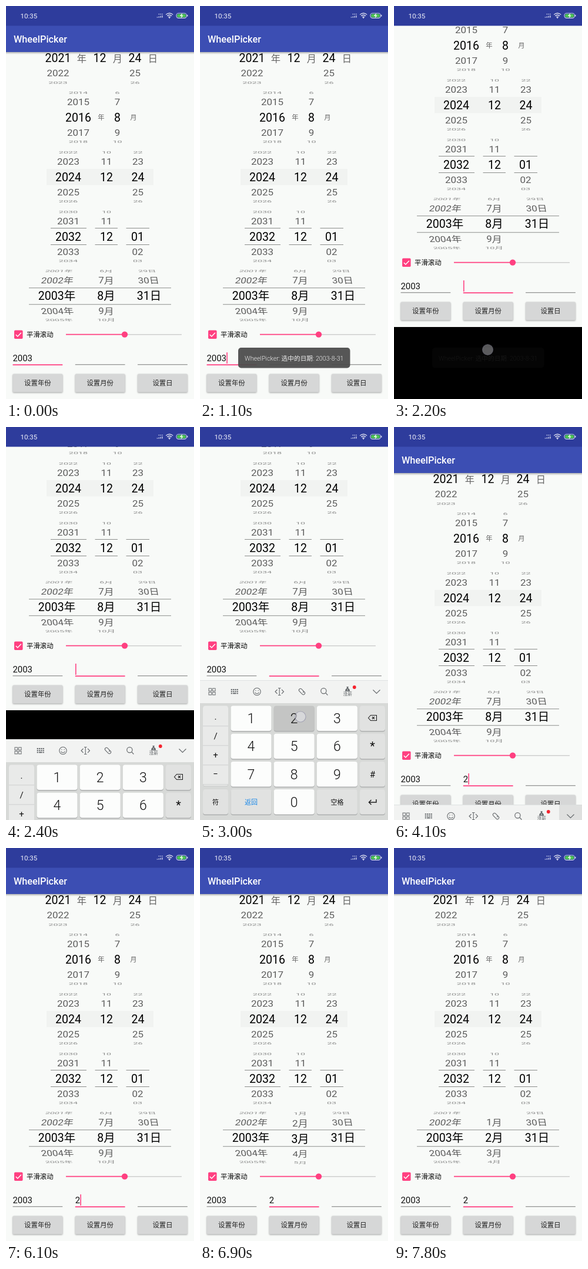
An HTML page with a canvas for the animation above (8 s loop, 320 px wide and 666 px high).

```html
<!DOCTYPE html>
<html lang="zh-CN">
<head>
<meta charset="utf-8">
<style>
  html, body { margin: 0; width: 100%; height: 100%; overflow: hidden; background: #000; }
  canvas { display: block; width: 320px; height: 666px; }
</style>
</head>
<body>
<canvas></canvas>
<script>
const W = 320, H = 666, LOOP = 8000;
const PINK = '#ff4081', BG = '#f8faf8';
const FONT = 'Roboto, "Noto Sans CJK SC", "Noto Sans CJK", sans-serif';
const canvas = document.querySelector('canvas');
const c = canvas.getContext('2d');
const dpr = window.devicePixelRatio || 1;
canvas.width = W * dpr;
canvas.height = H * dpr;

const ramp = (t, a, b) => Math.min(1, Math.max(0, (t - a) / (b - a)));
const easeOut = p => 1 - (1 - p) ** 2;
const smooth = p => p * p * (3 - 2 * p);

function rect(x, y, w, h, fill, r = 0) {
  c.fillStyle = fill;
  c.beginPath();
  c.roundRect(x, y, w, h, r);
  c.fill();
}

// y is the middle of the capitals
function text(s, x, y, size, color = '#000', align = 'center', weight = 400) {
  c.font = `${weight} ${size}px ${FONT}`;
  c.fillStyle = color;
  c.textAlign = align;
  c.fillText(s, x, y + size * .36);
}

function path(d, color, width = 1) {
  c.strokeStyle = color;
  c.lineWidth = width;
  c.stroke(new Path2D(d));
}

function disc(x, y, r, color) {
  c.fillStyle = color;
  c.beginPath();
  c.arc(x, y, r, 0, 7);
  c.fill();
}

function layer(draw, dx = 0, dy = 0, alpha = 1) {
  c.save();
  c.translate(dx, dy);
  c.globalAlpha = alpha;
  draw();
  c.restore();
}

// One column of numbers on a cylinder; bend leans the outer rows sideways
function column(x, y, value, min, max, { unit = '', pad = 1, bend = 0 } = {}) {
  for (let n = Math.ceil(value - 2.3); n <= value + 2.3; n++) {
    if (n < min || n > max) continue;
    const k = n - value, far = Math.abs(k);
    const sx = 1 - .133 * far, sy = sx * Math.cos(.6 * k);
    layer(() => {
      c.transform(sx, 0, .2 * bend * k * sy, sy, 0, 0);
      text(String(n).padStart(pad, '0') + unit, 0, 0, 19.56, far < .5 ? '#000' : '#5c5c5c');
    }, x + bend * k * k, y + 43.3 * Math.sin(.644 * k), far > 1 ? 1 - .3 * (far - 1) : 1);
  }
}

function wheels(month) {
  const year = (x, y, v, o) => column(x, y, v, 1900, 2100, o);
  year(88.5, 88.3, 2021);
  column(159.5, 88.3, 12, 1, 12);
  column(219.5, 88.3, 24, 1, 31);
  text('年', 129, 89, 16.3, '#666');
  text('月', 190, 89, 16.3, '#666');
  text('日', 250, 89, 16.3, '#666');

  year(123, 188.8, 2016);
  column(189.5, 188.8, 8, 1, 12);
  text('年', 162, 189, 11.4, '#666');
  text('月', 217, 189, 11.4, '#666');

  rect(69, 276, 182, 27.5, '#f1f3f1');
  year(106, 290, 2024);
  column(171, 290, 12, 1, 12);
  column(224.5, 290, 24, 1, 31);

  year(106, 390.5, 2032);
  column(171, 390.5, 12, 1, 12);
  column(224, 390.5, 1, 1, 31, { pad: 2 });
  for (const [x, w] of [[76, 61], [151.5, 38.5], [204.5, 39.5]])
    for (const y of [376, 404]) rect(x, y, w, 1, '#8c8e8c');

  year(86.5, 491, 2003, { unit: '年', bend: .9 });
  layer(() => {
    c.beginPath();
    c.rect(119, 447, 83, 89);
    c.clip();
    column(170.5, 491, month, 1, 12, { unit: '月' });
  });
  column(243.5, 491, 31, 1, 31, { unit: '日', bend: -.8 });
  rect(39, 477.2, 242, 1, '#8c8e8c');
  rect(39, 505.2, 242, 1, '#8c8e8c');
}

function controls(t, cursorOn) {
  rect(14, 549.5, 14.5, 14.5, PINK, 1.8);
  path('M16.8 557l3 3 6-6.2', '#fff', 1.5);
  text('平滑滚动', 35, 557, 11.4, '#000', 'left');
  rect(202, 556, 97, 1.4, '#cfd0cf');
  rect(102, 555.8, 100, 1.7, PINK);
  disc(202, 556.6, 5.2, PINK);

  const focus = t < 2100 ? 0 : 1;
  const values = ['2003', t < 3100 ? '' : '2', ''];
  const names = ['设置年份', '设置月份', '设置日'];
  const press = ramp(t, 6300, 6400) * (1 - ramp(t, 6500, 6900));
  names.forEach((name, i) => {
    const x = 11.5 + 106.3 * i;
    const active = i === focus;
    text(values[i], x, 596.8, 14.9, '#111', 'left');
    rect(x, 607.2, 84.8, active ? 1.8 : 1, active ? PINK : '#777');
    if (active && cursorOn) rect(x + (values[i] ? c.measureText(values[i]).width : 0) + .2, 587, 1.6, 19, PINK);

    c.shadowColor = 'rgba(0,0,0,.35)';
    c.shadowBlur = 2.5 * dpr;
    c.shadowOffsetY = dpr;
    rect(x, 623.5, 84.8, 31, '#d6d7d7', 1.6);
    c.shadowColor = 'transparent';
    if (i === 1 && press) rect(x, 623.5, 84.8, 31, `rgba(0,0,0,${.16 * press})`, 1.6);
    text(name, x + 42.4, 639, 11.4, '#222');
  });
}

function app(t, cursorOn) {
  rect(0, 0, W, H, BG);
  wheels(8 - 6 * smooth(ramp(t, 6450, 7050)));
  controls(t, cursorOn);
  const shade = c.createLinearGradient(0, 78, 0, 82);
  shade.addColorStop(0, 'rgba(0,0,0,.28)');
  shade.addColorStop(1, 'rgba(0,0,0,0)');
  rect(0, 78, W, 4, shade);
  rect(0, 33, W, 45, '#3c4eb3');
  text('WheelPicker', 13, 56.5, 16.3, '#fff', 'left', 500);
}

function statusBar() {
  rect(0, 0, W, 33.4, '#2e3c9c');
  text('10:35', 24.5, 16.5, 11.6, '#f2f3fa', 'left');
  for (let i = 0; i < 4; i++) {
    rect(256.8 + i * 2.8, 18.4 - i * .8, 1.5, 1.4 + i * .8, '#c3c8e8');
    if (i > 0) rect(256.8 + i * 2.8, 13, 1.5, 1.5, '#c3c8e8');
  }
  path('M272.2 14.6q6-5 12 0M274.2 16.8q4-3.4 8 0M276.2 18.8q2-1.6 4 0', '#fff', 1.1);
  disc(278.2, 20, .9, '#fff');
  rect(289.5, 11.7, 18.4, 9.2, '#e6ebf5', 4.2);
  rect(290.4, 12.6, 16.6, 7.4, '#2e3c9c', 3.4);
  rect(291.2, 13.4, 15, 5.8, '#4cc552', 2.6);
  rect(308.2, 14.8, 1.2, 3, '#e6ebf5', .6);
  path('M299.8 13.2l-2.6 3.2h3.2l-2.2 2.9', '#fff', 1.2);
}

function key(x, y, w, label, fill, size = 23, color = '#111', weight = 400) {
  rect(x, y + 1, w, 43, '#adafaf', 4);
  rect(x, y, w, 42.5, fill, 4);
  text(label, x + w / 2, y + 21.5, size, color, 'center', weight);
}

function toolbar(t) {
  const ink = '#666a6d';
  rect(0, 0, W, 39, '#f2f3f2');
  if (t >= 3600) rect(281, 0, 39, 39, '#dfe0df');
  rect(0, 0, W, .7, '#d9dcdc');
  for (const x of [15, 21.5]) for (const y of [14, 20.5]) {
    c.strokeStyle = ink;
    c.lineWidth = 1;
    c.strokeRect(x, y, 4.5, 4.5);
  }
  for (let i = 0; i < 8; i++) rect(52.7 + i % 4 * 3.3, 15 + (i >> 2) * 3.2, 2.2, 2, ink);
  rect(52.7, 21.4, 2.2, 2, ink);
  rect(56, 21.4, 5.5, 2, ink);
  rect(62.6, 21.4, 2.2, 2, ink);
  path('M103.2 19.5a6.2 6.2 0 1 0-12.4 0a6.2 6.2 0 1 0 12.4 0M93.5 20.8q3.5 4.5 7 0M94.8 17v1.2M99.2 17v1.2', ink, 1.1);
  path('M131.5 16l-3.5 3.5 3.5 3.5M139 16l3.5 3.5-3.5 3.5M133 13.5h4.5M133 25.5h4.5M135.2 13.5v12', ink, 1.1);
  // two interlocked links on a diagonal
  layer(() => {
    c.rotate(Math.PI / 4);
    path('M1.5 2.6h-5a2.6 2.6 0 0 1 0-5.2h3.5a2.6 2.6 0 0 1 2.6 2.6M-1.5-2.6h5a2.6 2.6 0 0 1 0 5.2h-3.5', ink, 1.1);
  }, 173.5, 19.5);
  path('M215 18.3a4.6 4.6 0 1 0-9.2 0a4.6 4.6 0 1 0 9.2 0M213.8 21.7l3.6 3.8', ink, 1.2);
  c.fillStyle = ink;
  c.fill(new Path2D('M249.3 11h3.6l-.9 2.2q3.4 2.4 3 5.6h-7.8q-.4-3.2 3-5.6z'));
  text('¥', 251.1, 16.5, 4, '#fff');
  text('涨薪', 251.3, 23.2, 7.6, ink);
  disc(262.8, 12, 2.9, '#f5222d');
  path('M294.5 16.5l6 6 6-6', ink, 1.2);
}

function keyboard(t) {
  toolbar(t);
  const light = '#fcfdfc', grey = '#e1e2e1';
  rect(0, 39, W, 198, '#d7d9d7');
  rect(5, 44, 43, 136, '#b2b4b3', 4);
  rect(5, 43.5, 43, 136, '#e9eae9', 4);
  ['.', '/', '+', '−'].forEach((s, i) => {
    text(s, 26.5, 62 + i * 32.3, 15, '#111');
    rect(5, 77.5 + i * 33, 43, .8, '#c4c6c5');
  });
  const pressed = t >= 2950 && t < 3150;
  for (let n = 1; n < 10; n++) {
    const col = (n - 1) % 3, row = (n - 1) / 3 | 0;
    key(52.5 + col * 73.2, 43.5 + row * 47.2, 69, n, n === 2 && pressed ? '#c4c5c4' : light, 23, '#111', 300);
  }
  ['', '*', '#', ''].forEach((s, i) => key(272, 43.5 + i * 47.2, 43, s, grey, s === '*' ? 20 : 15));
  key(5, 185.1, 43, '符', grey, 11);
  key(52.5, 185.1, 69, '返回', grey, 11, '#1687e8');
  key(125.7, 185.1, 69, '0', light, 23, '#111', 300);
  key(198.9, 185.1, 69, '空格', grey, 11);
  path('M286.5 64l4-4.5h10v9h-10zM293 62l4 4M297 62l-4 4', '#222', 1.1);
  path('M300 202v5h-12.5M291.5 203l-4 4 4 4', '#222', 1.5);
}

function toast(t) {
  const show = easeOut(ramp(t, 150, 600));
  const alpha = show * (1 - ramp(t, 1960, 2220));
  if (!alpha) return;
  layer(() => {
    rect(65, 579, 190.5, 34.5, 'rgba(76,76,76,.94)', 5);
    text('WheelPicker: 选中的日期: 2003-8-31', 160.3, 597, 10.7, '#eee', 'center', 300);
  }, 0, 18 * (1 - show), alpha);
}

function touch(t, x, y, start, end) {
  if (t < start || t >= end + 100) return;
  layer(() => {
    disc(x, y, 9, 'rgba(228,228,234,.6)');
    c.strokeStyle = 'rgba(140,140,165,.6)';
    c.lineWidth = 1.2;
    c.stroke();
  }, 0, 0, 1 - ramp(t, end, end + 100));
}

function draw(t) {
  c.setTransform(dpr, 0, 0, dpr, 0, 0);
  rect(0, 0, W, H, '#000');
  const pan = 186 * (easeOut(ramp(t, 2100, 2345)) - easeOut(ramp(t, 3700, 3950)));
  const cursorOn = (t + 900) % 1000 < 500;
  layer(() => app(t, cursorOn), 0, -Math.round(pan));

  const lift = 237 * (easeOut(ramp(t, 2250, 2680)) - smooth(ramp(t, 3800, 4180)));
  if (lift > 0) layer(() => keyboard(t), 0, H - Math.round(lift));

  statusBar();
  toast(t);
  touch(t, 159.5, 582.5, 2000, 2165);
  touch(t, 171, 491, 2950, 3100);
  touch(t, 300, 448, 3600, 3720);
  touch(t, 160, 638, 6300, 6440);
}

const begin = performance.now();
function frame() {
  draw((performance.now() - begin) % LOOP);
  requestAnimationFrame(frame);
}
frame();
</script>
</body>
</html>
```
